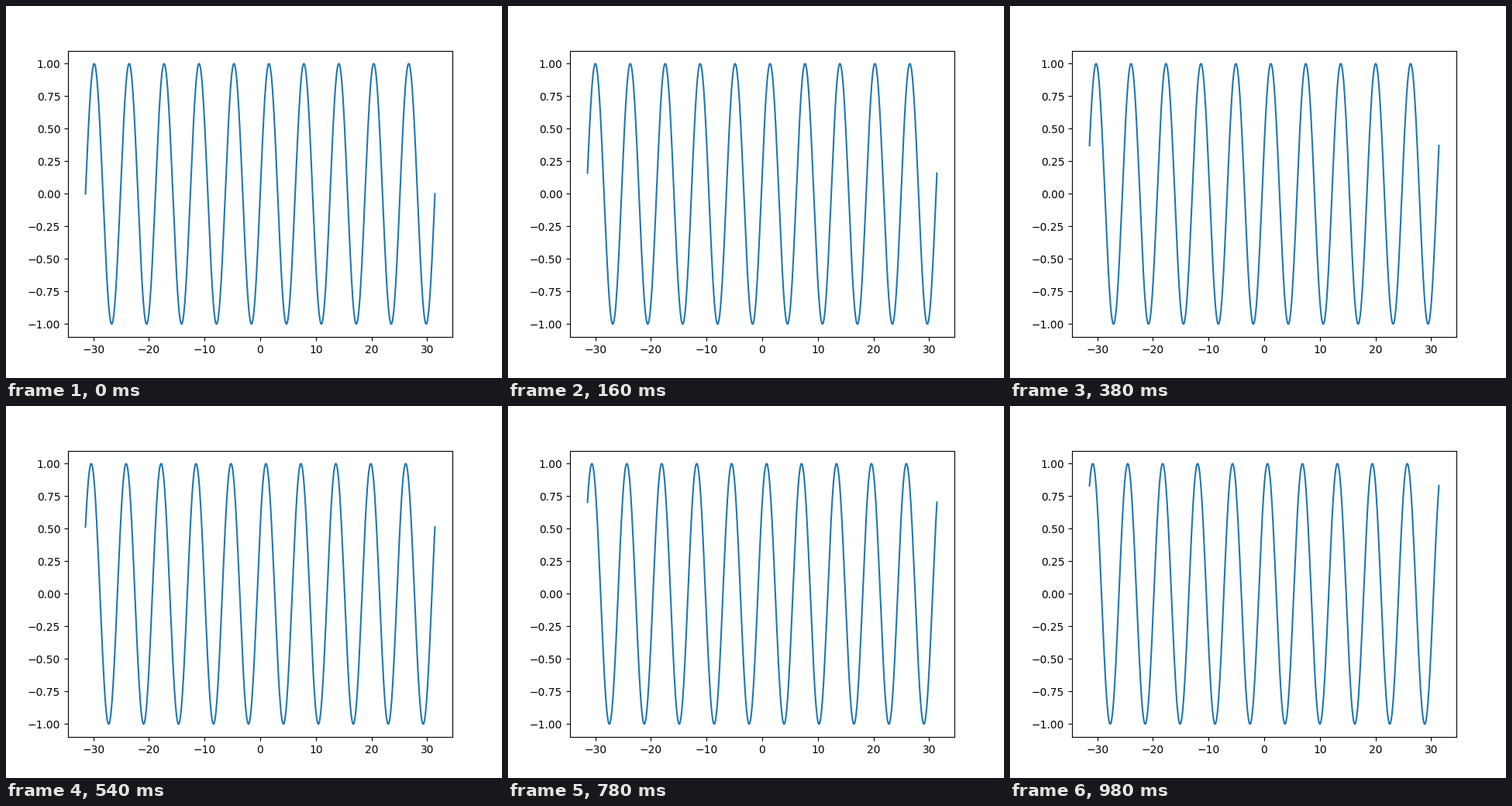
Animation, 640 px wide and 480 px high, one loop 1000 ms. Source, as a matplotlib script:

```python
import matplotlib.pyplot as plt
import numpy as np
from matplotlib.animation import FuncAnimation

FRAMES = 50
INTERVAL = 20  # ms

fig, ax = plt.subplots(figsize=(6.4, 4.8), dpi=100)
x = np.linspace(-10 * np.pi, 10 * np.pi, 1000)
line, = ax.plot(x, np.sin(x))
# Keep the limits fixed while the wave travels.
ax.set_xlim(-11 * np.pi, 11 * np.pi)
ax.set_ylim(-1.1, 1.1)


def update(frame):
    line.set_ydata(np.sin(x + frame / FRAMES))
    return line,


anim = FuncAnimation(fig, update, frames=FRAMES, interval=INTERVAL,
                     repeat=True, repeat_delay=0)
plt.show()
```
